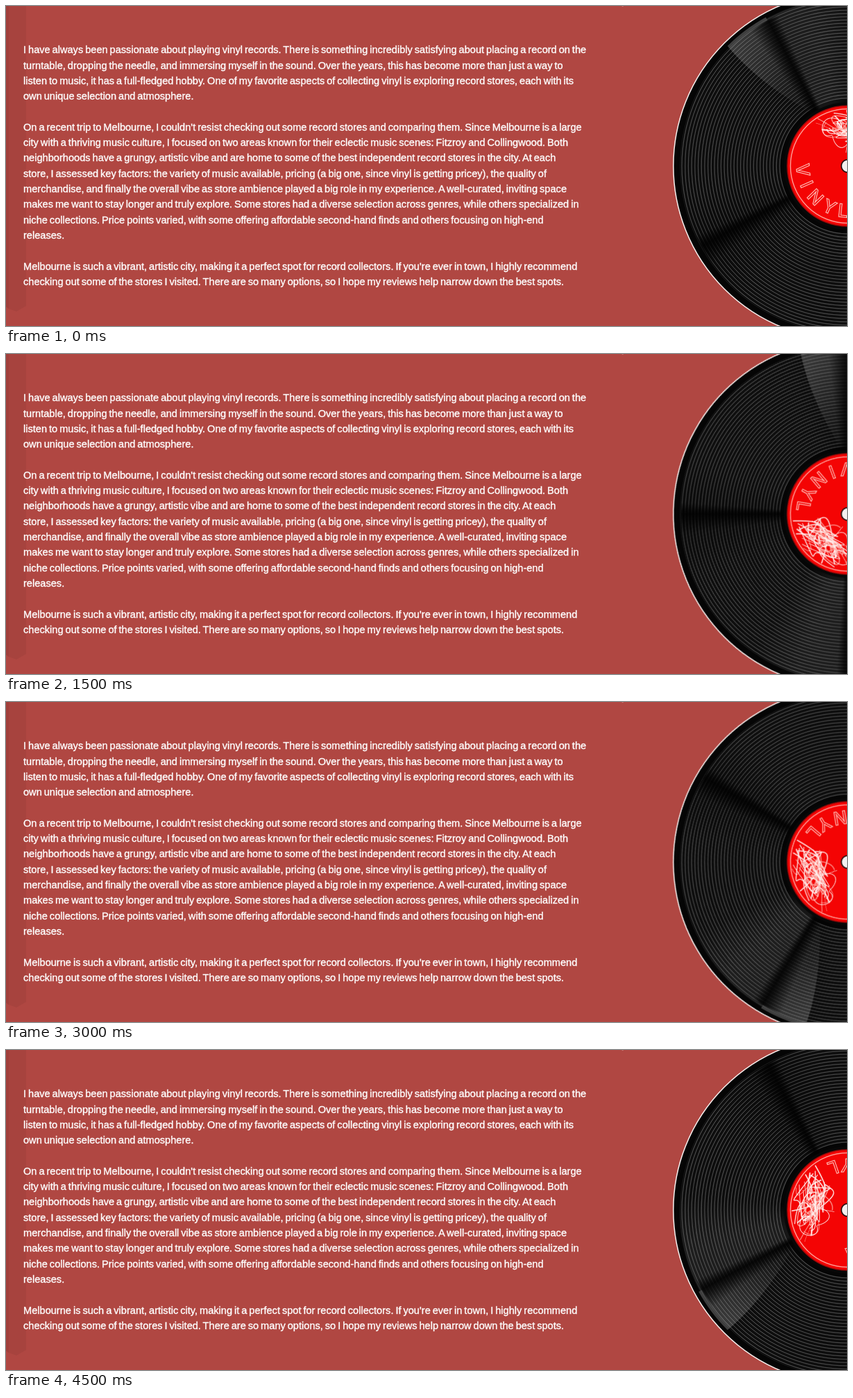
Animation of 1212x462 px, one loop 5000 ms. Source, as an HTML page with a canvas:

```html
<!DOCTYPE html>
<html lang="en">
<head>
<meta charset="utf-8">
<title>Vinyl record stores</title>
<style>
  html, body { margin: 0; width: 100%; height: 100%; overflow: hidden; background: #b04742; }
  #stage { position: absolute; left: 0; top: 0; width: 1212px; height: 462px; overflow: hidden; background: #b04742; }
  svg { position: absolute; left: 0; top: 0; }
  text {
    font: 14.6px "Liberation Sans", Arial, sans-serif;
    word-spacing: -1.1px;
    fill: #fff; stroke: #fff; stroke-width: .35px;
  }
  #disc { position: absolute; left: 956.6px; top: -25px; width: 512px; height: 512px; }
</style>
</head>
<body>
<div id="stage">
  <svg id="page" width="1212" height="462" viewBox="0 0 1212 462">
    <path d="M0 0H29V433L15 441L4 437L0 434Z" fill="#a7433e"/>
    <path d="M0 0H4V437L0 434Z" fill="#a03f3b"/>
    <path d="M887 0h3l-1 1z" fill="#d08c88"/>
  </svg>
  <canvas id="disc" width="1024" height="1024"></canvas>
</div>
<script>
const lines = [
  "I have always been passionate about playing vinyl records. There is something incredibly satisfying about placing a record on the",
  "turntable, dropping the needle, and immersing myself in the sound. Over the years, this has become more than just a way to",
  "listen to music, it has a full-fledged hobby. One of my favorite aspects of collecting vinyl is exploring record stores, each with its",
  "own unique selection and atmosphere.",
  "",
  "On a recent trip to Melbourne, I couldn't resist checking out some record stores and comparing them. Since Melbourne is a large",
  "city with a thriving music culture, I focused on two areas known for their eclectic music scenes: Fitzroy and Collingwood. Both",
  "neighborhoods have a grungy, artistic vibe and are home to some of the best independent record stores in the city. At each",
  "store, I assessed key factors: the variety of music available, pricing (a big one, since vinyl is getting pricey), the quality of",
  "merchandise, and finally the overall vibe as store ambience played a big role in my experience. A well-curated, inviting space",
  "makes me want to stay longer and truly explore. Some stores had a diverse selection across genres, while others specialized in",
  "niche collections. Price points varied, with some offering affordable second-hand finds and others focusing on high-end",
  "releases.",
  "",
  "Melbourne is such a vibrant, artistic city, making it a perfect spot for record collectors. If you're ever in town, I highly recommend",
  "checking out some of the stores I visited. There are so many options, so I hope my reviews help narrow down the best spots."
];
const page = document.getElementById("page");
lines.forEach((line, i) => {
  const t = document.createElementNS("http://www.w3.org/2000/svg", "text");
  t.setAttribute("x", 25);
  t.setAttribute("y", 68.2 + i * 22.32);
  t.textContent = line;
  page.append(t);
});

const disc = document.getElementById("disc");
const ctx = disc.getContext("2d");
const rad = deg => deg * Math.PI / 180;
const polar = (r, deg) => [r * Math.cos(rad(deg)), r * Math.sin(rad(deg))];
const SPOKE = 61.2; // first dark spoke, one every quarter turn

function circle(r, fill, stroke, width = 1) {
  ctx.beginPath();
  ctx.arc(0, 0, r, 0, 2 * Math.PI);
  if (fill) { ctx.fillStyle = fill; ctx.fill(); }
  if (stroke) { ctx.strokeStyle = stroke; ctx.lineWidth = width; ctx.stroke(); }
}

// Disc tinted by angle, repeating the [degrees, alpha] stops every sector
function tint(r, rgb, sector, stops) {
  const g = ctx.createConicGradient(rad(SPOKE), 0, 0);
  for (let start = 0; start < 360; start += sector) {
    for (const [deg, a] of stops) g.addColorStop((start + deg) / 360, `rgba(${rgb},${a})`);
  }
  circle(r, g);
}

function drawGrooves() {
  for (let r = 98; r < 239; r += 4.7) {
    circle(r, null, "#4b4b4b", 1.3);
    circle(r + 2.2, null, "#1d1d1d", .8);
  }
}

// Leaf of light that ends at a spoke
function drawShine(spoke) {
  const glow = ctx.createRadialGradient(0, 0, 100, 0, 0, 246);
  glow.addColorStop(0, "rgba(255,255,255,.02)");
  glow.addColorStop(.5, "rgba(255,255,255,.13)");
  glow.addColorStop(1, "rgba(255,255,255,.23)");
  ctx.fillStyle = glow;
  ctx.beginPath();
  ctx.arc(0, 0, 245, rad(spoke - 16.2), rad(spoke));
  ctx.lineTo(...polar(104, spoke));
  ctx.lineTo(...polar(104, spoke - 8));
  ctx.quadraticCurveTo(...polar(180, spoke - 18), ...polar(245, spoke - 16.2));
  ctx.fill();
}

function drawWord(turn) {
  ctx.font = '500 26px Inter, "Liberation Sans", sans-serif';
  ctx.textAlign = "center";
  ctx.textBaseline = "alphabetic";
  ctx.strokeStyle = "#ffb9b2";
  ctx.lineWidth = 1.2;
  const degs = [175, 156, 136, 114, 96];
  [..."VINYL"].forEach((ch, i) => {
    ctx.save();
    ctx.rotate(rad(degs[i] + turn - 90));
    ctx.strokeText(ch, 0, 74);
    ctx.restore();
  });
}

function drawScribble() {
  let seed = 29;
  const rnd = () => (seed = seed * 16807 % 2147483647) / 2147483647;
  const spot = (lo, hi, spread) => polar(lo + (hi - lo) * rnd(), 278 + spread * (rnd() - .5));
  ctx.save();
  ctx.beginPath();
  ctx.arc(0, 0, 82, 0, 2 * Math.PI);
  ctx.clip();
  ctx.lineCap = "round";
  for (let i = 0; i < 34; i++) {
    ctx.beginPath();
    ctx.moveTo(...spot(45, 82, 92));
    ctx.bezierCurveTo(...spot(20, 105, 125), ...spot(20, 105, 125), ...spot(i % 4 ? 42 : 14, 82, 92));
    ctx.strokeStyle = i % 3 ? "rgba(255,240,238,.88)" : "rgba(255,170,162,.75)";
    ctx.lineWidth = .7 + rnd() * 1.3;
    ctx.stroke();
  }
  ctx.restore();
}

ctx.scale(2, 2);
ctx.translate(256, 256);
circle(251.2, "#050505", "#f8f0ee", 1.5);
drawGrooves();
tint(243, "255,255,255", 180, [[0, .1], [14, .07], [34, 0], [180, 0]]);
drawShine(SPOKE);
drawShine(SPOKE + 180);
tint(240, "2,2,2", 90, [[0, .9], [1.4, .75], [4, .2], [18, 0], [68, .04], [83, .22], [88, .75], [90, .9]]);
circle(92, "#080808");
circle(87, "#f40404", "#a80808", 1.6);
circle(82.5, null, "#ff9d96", 1.4);
drawWord(0);
drawWord(245);
drawScribble();
circle(10, "#2a1010");
circle(8.3, "#f4f0f0");

// Ten held poses: a quarter turn back, then slow even steps
const poses = Array.from({ length: 10 }, (_, i) => i === 0 ? 0 : i === 1 ? 270 : 198.6 + 10.2 * (i - 2));
const steps = poses.map((deg, i) => ({
  offset: i / 10, transform: `rotate(${deg}deg)`, easing: "steps(1, end)"
}));
steps.push({ offset: 1, transform: "rotate(0deg)" });
disc.animate(steps, { duration: 5000, iterations: Infinity });
</script>
</body>
</html>
```
